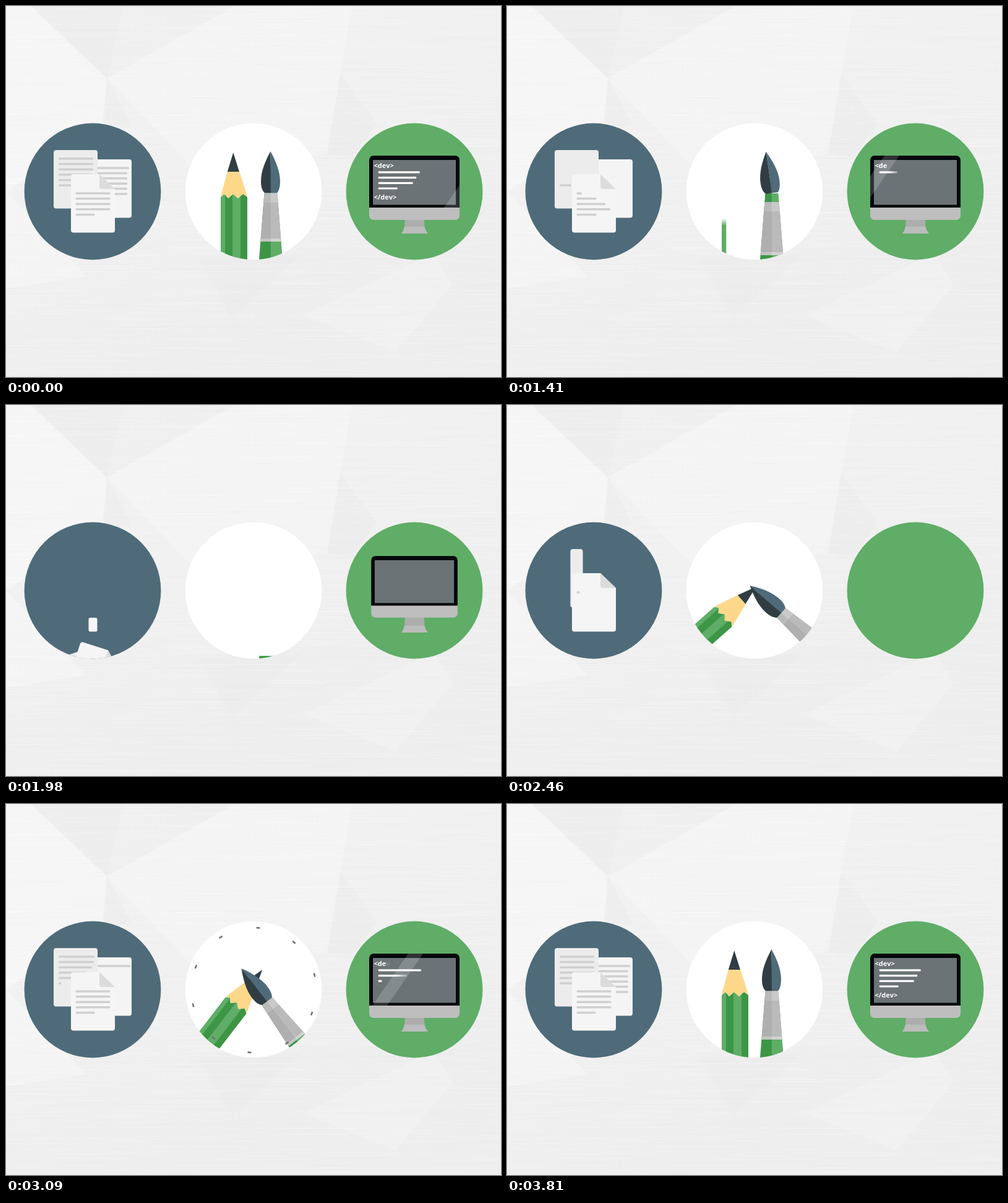
Recreate the animation shown at these times as an HTML page with a canvas. Size 800x600 px, loop 4.5 s.

```html
<!DOCTYPE html>
<html lang="en">
<head>
<meta charset="utf-8">
<title>Write, design, develop</title>
<style>
html, body { margin: 0; width: 100%; height: 100%; overflow: hidden; background: #f0f0f0; }
canvas { display: block; }
</style>
</head>
<body>
<canvas id="stage" width="800" height="600"></canvas>
<script>
const LOOP = 4500, STEP = 30, REST = 3810;
const BLUE = '#4f6b79', GREEN = '#5fad67', DEEP = '#3c9645', DARK = '#303e43';
const canvas = document.getElementById('stage');
let c = canvas.getContext('2d');

const clamp = u => Math.max(0, Math.min(1, u));
const span = (t, start, length) => clamp((t - start) / length);
const mix = (a, b, u) => a + (b - a) * u;
const smooth = u => u * u * (3 - 2 * u);
const inBack = u => u * u * (2 * u - 1);
const outBack = u => 1 - inBack(1 - u);
const outQuad = u => 1 - (1 - u) * (1 - u);

// 1 when fully shown: leaves at "out", returns at "back"
function shown(t, out, back, length = 500) {
  return t < back ? 1 - inBack(span(t, out, length)) : outBack(span(t, back, length));
}

function poly(color, ...p) {
  c.fillStyle = color;
  c.beginPath();
  for (let i = 0; i < p.length; i += 2) c.lineTo(p[i], p[i + 1]);
  c.closePath();
  c.fill();
}

function rect(color, x, y, w, h, r = 0) {
  if (w <= 0 || h <= 0) return;
  c.fillStyle = color;
  c.beginPath();
  c.roundRect(x, y, w, h, r);
  c.fill();
}

function layer(draw) {
  c.save();
  draw();
  c.restore();
}

function about(x, y, draw) {
  c.translate(x, y);
  draw();
  c.translate(-x, -y);
}

function disc(x, color, draw) {
  layer(() => {
    c.fillStyle = color;
    c.beginPath();
    c.arc(x, 300, 110.4, 0, Math.PI * 2);
    c.fill();
    c.clip();
    draw();
  });
}

function makeBackdrop() {
  const sheet = document.createElement('canvas');
  sheet.width = 800;
  sheet.height = 600;
  const screen = c;
  c = sheet.getContext('2d');
  const g = c.createLinearGradient(0, 0, 250, 600);
  g.addColorStop(0, '#f2f2f2');
  g.addColorStop(0.5, '#f1f1f1');
  g.addColorStop(1, '#eeeeee');
  c.fillStyle = g;
  c.fillRect(0, 0, 800, 600);
  poly('rgba(255,255,255,.3)', 0, 0, 40, 0, 163, 117, 155, 200, 0, 300);
  poly('rgba(0,0,0,.014)', 40, 0, 190, 0, 163, 117);
  poly('rgba(0,0,0,.008)', 190, 0, 370, 0, 163, 117);
  poly('rgba(0,0,0,.012)', 163, 117, 205, 195, 158, 195);
  poly('rgba(255,255,255,.18)', 163, 117, 370, 0, 560, 0, 540, 110, 520, 240, 300, 260);
  poly('rgba(0,0,0,.01)', 540, 110, 600, 190, 560, 245, 518, 240);
  poly('rgba(255,255,255,.25)', 0, 300, 130, 437, 0, 457);
  poly('rgba(0,0,0,.007)', 310, 410, 480, 400, 365, 505);
  poly('rgba(255,255,255,.15)', 690, 400, 722, 450, 630, 560, 480, 500);
  let seed = 7;
  const rnd = () => (seed = seed * 16807 % 2147483647) / 2147483647;
  for (let i = 0; i < 1300; i++) {
    c.fillStyle = rnd() < 0.5 ? 'rgba(255,255,255,.16)' : 'rgba(0,0,0,.008)';
    c.fillRect(rnd() * 900 - 100, Math.floor(rnd() * 600), 30 + rnd() * 130, 1);
  }
  c = screen;
  return sheet;
}

// Documents
const pages = [
  { x: 132, y: 248, color: '#f4f4f4', fall: 1470, spin: -14, rise: 2480 },
  { x: 77, y: 233, color: '#ececec', fall: 1550, spin: -20, rise: 2260 },
  { x: 105, y: 272, color: '#f5f5f5', fall: 1620, spin: 22, rise: 1945, fold: true }
];

function pageShape(p, x, y, w, h) {
  if (!p.fold || w < 60 || h < 90) {
    rect(p.color, x, y, w, h, Math.min(4, w / 5));
    return;
  }
  c.fillStyle = p.color;
  c.beginPath();
  c.moveTo(x + 4, y);
  c.lineTo(x + w - 25, y);
  c.lineTo(x + w, y + 24);
  c.arcTo(x + w, y + h, x, y + h, 4);
  c.arcTo(x, y + h, x, y, 4);
  c.arcTo(x, y, x + w, y, 4);
  c.fill();
  c.fillStyle = '#dcdcdc';
  c.beginPath();
  c.moveTo(x + w - 25, y);
  c.lineTo(x + w, y + 24);
  c.arcTo(x + w - 25, y + 24, x + w - 25, y, 4);
  c.closePath();
  c.fill();
}

function drawPage(p, t) {
  const w = 71, h = 94.5;
  const u = span(t, p.fall, 450);
  if (u < 1) layer(() => {
    c.translate(p.x + w / 2, p.y + h / 2 + 186 * u * u);
    c.rotate(p.spin * u * Math.PI / 180);
    pageShape(p, -w / 2, -h / 2, w, h);
  });
  if (t > p.rise) {
    const high = h * smooth(span(t, p.rise, 110));
    const wide = mix(14, w, outQuad(span(t, p.rise + 190, 180)));
    pageShape(p, p.x + (w - wide) / 2, p.y + h - high, wide, high);
  }
}

function textRow(x, y, w, part) {
  if (part > 0.01) rect('#d0d0d0', x, y - 1.75, w * part, 3.5, 1.5);
}

function drawDocs(t) {
  drawPage(pages[0], t);
  for (let i = 0; i < 6; i++) {
    const out = 205 + 70 * (i ? i - 1 : 5);
    const back = i ? 3090 + 42 * i : 2780;
    textRow(140, 262 + 8.4 * i, i ? 56 : 59, shown(t, out, back));
  }
  drawPage(pages[1], t);
  for (let i = 0; i < 6; i++)
    textRow(85, 247 + 8.6 * i, 56, shown(t, 608 + 70 * i, 2730 + 70 * i));
  drawPage(pages[2], t);
  for (let i = 0; i < 5; i++)
    textRow(112.5, 303 + 8.6 * i, i < 4 ? 56 : 31, shown(t, 930 + 70 * i, 2448 + 45 * i));
}

// Pencil and brush
const stripes = [
  [347, 7, GREEN, 1280], [354, 12, DEEP, 1200], [366, 13, GREEN, 1140], [379, 11, DEEP, 1090]
];

function pencilTop(lead, wood) {
  layer(() => about(367.5, 306, () => {
    c.scale(wood, wood);
    poly('#fed88a', -9.5, -39, 9.5, -39, 22.5, 2, 15.5, -2, 7, 5, -0.5, -2, -8.5, 5, -14.5, -2, -20.5, 2);
  }));
  layer(() => {
    c.translate(367.3, 268);
    c.scale(lead, lead);
    poly(DARK, 0, -31, 9.7, 0, -9.5, 0);
  });
}

function pencil() {
  layer(() => {
    c.beginPath();
    [347, 309, 353, 304, 359, 311, 367, 304, 375, 311, 383, 304, 390, 309, 390, 480, 347, 480]
      .forEach((v, i, p) => { if (i % 2) c.lineTo(p[i - 1], v); });
    c.clip();
    for (const [x, w, color] of stripes) rect(color, x, 300, w + 0.3, 180);
  });
  pencilTop(1, 1);
}

function pencilLeaving(t) {
  if (t < 900) return pencil();
  for (const [x, w, color, start] of stripes) {
    const u = span(t, start, 220), top = 307 + 104 * u * u;
    if (u === 1) continue;
    const g = c.createLinearGradient(0, top, 0, top + 1 + 18 * u);
    g.addColorStop(0, color + (u ? '00' : 'ff'));
    g.addColorStop(1, color);
    rect(g, x, top, w + 0.3, 420 - top);
  }
  const wood = 1 - inBack(span(t, 980, 120)), lead = 1 - inBack(span(t, 890, 120));
  pencilTop(Math.max(0, lead), Math.max(0, wood));
}

function brushHead() {
  c.fillStyle = DARK;
  c.beginPath();
  c.moveTo(427.5, 235);
  c.bezierCurveTo(419, 251, 412, 267, 412, 284);
  c.quadraticCurveTo(412, 297, 418, 302.5);
  c.lineTo(428.5, 302.5);
  c.fill();
  c.fillStyle = BLUE;
  c.beginPath();
  c.moveTo(427.5, 235);
  c.bezierCurveTo(436, 251, 443, 267, 443, 284);
  c.quadraticCurveTo(443, 297, 438, 302.5);
  c.lineTo(428, 302.5);
  c.fill();
}

function sleeve(top, bottom, left, right) {
  const half = y => 10.5 + (y - 303) * 0.079;
  const a = half(top), b = half(bottom);
  poly(left, 428, top, 428 - a, top, 428 - b, bottom, 428, bottom);
  poly(right, 427.8, top, 428 + a, top, 428 + b, bottom, 427.8, bottom);
}

function handle(greenTop, top, bottom) {
  sleeve(greenTop, 480, DEEP, GREEN);
  if (top > 420) return;
  sleeve(top, bottom, '#afafaf', '#bababa');
  sleeve(top, top + 15, '#bababa', '#c9c9c9');
  sleeve(bottom, bottom + 5, '#c4c4c4', '#d2d2d2');
}

function brush() {
  handle(303, 303, 376);
  brushHead();
}

function brushLeaving(t) {
  const d = Math.pow(Math.max(0, t - 1200) / 210, 2);
  const u = span(t, 1480, 510);
  if (u < 1) handle(303 + 107 * u * u, 303 + 14 * d, 376 + 22 * d);
  const size = 1 - span(t, 1440, 170) ** 2;
  if (size > 0) layer(() => about(428, 303, () => {
    c.rotate(-0.13 * span(t, 1250, 160) ** 2);
    c.scale(size, size);
    about(-428, -303, brushHead);
  }));
}

// time, tip shift x and y, degrees
const swing = [
  [2200, -65, 165, 62], [2460, 35, 57, 48.5], [3090, 47, 31, 37.5], [3600, 0, 0, 0]
];

function pose(t) {
  let i = 0;
  while (i < swing.length - 2 && t > swing[i + 1][0]) i++;
  const a = swing[i], b = swing[i + 1];
  const u = span(t, a[0], b[0] - a[0]);
  const e = i ? smooth(u) : outQuad(u);
  return [1, 2, 3].map(k => mix(a[k], b[k], e));
}

function swung(x, y, side, [dx, dy, deg], draw) {
  layer(() => {
    c.translate(x + dx * side, y + dy);
    c.rotate(side * deg * Math.PI / 180);
    c.translate(-x, -y);
    draw();
  });
}

function burst(t) {
  const u = span(t, 2880, 360);
  if (u <= 0 || u >= 1) return;
  const r = mix(20, 118, outQuad(u));
  for (let i = 0; i < 10; i++) layer(() => {
    c.translate(400.5, 301);
    c.rotate((4 + 36 * i) * Math.PI / 180);
    rect('#6d7275', -3, -r - 1.3, 6, 2.6, 0.5);
  });
}

function drawTools(t) {
  if (t < 2200) {
    pencilLeaving(t);
    brushLeaving(t);
    return;
  }
  const p = pose(t);
  swung(367.3, 237, 1, p, pencil);
  swung(427.5, 235, -1, p, brush);
  burst(t);
}

// Monitor
const codeRows = [
  [67, 975, 2790], [61.5, 885, 2955], [56, 795, 3075], [31, 705, 3160]
];

function typed(text, y, alphaAt) {
  c.font = 'bold 11px "Open Sans", "Noto Sans", sans-serif';
  c.fillStyle = '#fff';
  let x = 594.5;
  [...text].forEach((ch, i) => {
    c.globalAlpha = alphaAt(i);
    c.fillText(ch, x, y);
    x += c.measureText(ch).width;
  });
  c.globalAlpha = 1;
}

function shineAt(t) {
  if (t < 100) return 766 + 0.7 * t;
  if (t > 1150 && t < 1600) return 610 - 0.7 * (t - 1410);
  if (t > 2940 && t < 3300) return 650 + 0.7 * (t - 3090);
  return 0;
}

function drawHead(t) {
  rect('#bebebe', 587, 300, 146, 46, 7);
  rect('#04070b', 587, 242, 146, 84, [7, 7, 0, 0]);
  rect('#6b7376', 593, 249, 134, 72.5);
  typed('<dev>', 262, i => t < 2500
    ? 1 - span(t, 1230 + 90 * (4 - i), 90)
    : span(t, 2805 + 90 * i, 90));
  typed('</dev>', 313, i => t < 2500
    ? 1 - span(t, 60 + 115 * (5 - i), 110)
    : span(t, 3290 + 75 * i, 75));
  codeRows.forEach(([w, out, back], i) => {
    const part = shown(t, out, back), len = w * part;
    if (part < 0.01) return;
    let fill = '#fff';
    if (part < 0.9) {
      fill = c.createLinearGradient(602, 0, 602 + len, 0);
      fill.addColorStop(0.55, '#fff');
      fill.addColorStop(1, 'rgba(255,255,255,.25)');
    }
    rect(fill, 601.7, 267.3 + 8.7 * i, len, 3.2, 1);
  });
  const x = shineAt(t);
  if (x) layer(() => {
    c.beginPath();
    c.roundRect(587, 242, 146, 84, [7, 7, 0, 0]);
    c.clip();
    poly('rgba(255,255,255,.17)', x, 242, x + 24, 242, x - 34, 326, x - 58, 326);
  });
}

function drawMonitor(t) {
  const stand = Math.max(0, shown(t, 2150, 2490, 230));
  if (stand > 0) layer(() => {
    c.translate(660, 368);
    c.scale(stand, stand);
    poly('#adadad', -15, -26, 15.5, -26, 16.5, -11, -16, -11);
    poly('#bcbcbc', -16, -11.2, 16.5, -11.2, 18.5, -5, 22, 0, -21, 0, -18, -5);
  });
  const size = t < 2580
    ? 1 - span(t, 1890, 430) ** 2
    : outBack(span(t, 2580, 280));
  if (size > 0) layer(() => {
    c.translate(660, 294);
    c.scale(size, size);
    c.translate(-660, -294);
    drawHead(t);
  });
}

const backdrop = makeBackdrop();

function draw(now) {
  const t = Math.min(REST, Math.floor((now % LOOP) / STEP) * STEP);
  c.drawImage(backdrop, 0, 0);
  disc(140, BLUE, () => drawDocs(t));
  disc(400, '#fff', () => drawTools(t));
  disc(660, GREEN, () => drawMonitor(t));
}

const began = performance.now();
function tick() {
  draw(performance.now() - began);
  requestAnimationFrame(tick);
}
tick();
</script>
</body>
</html>
```
